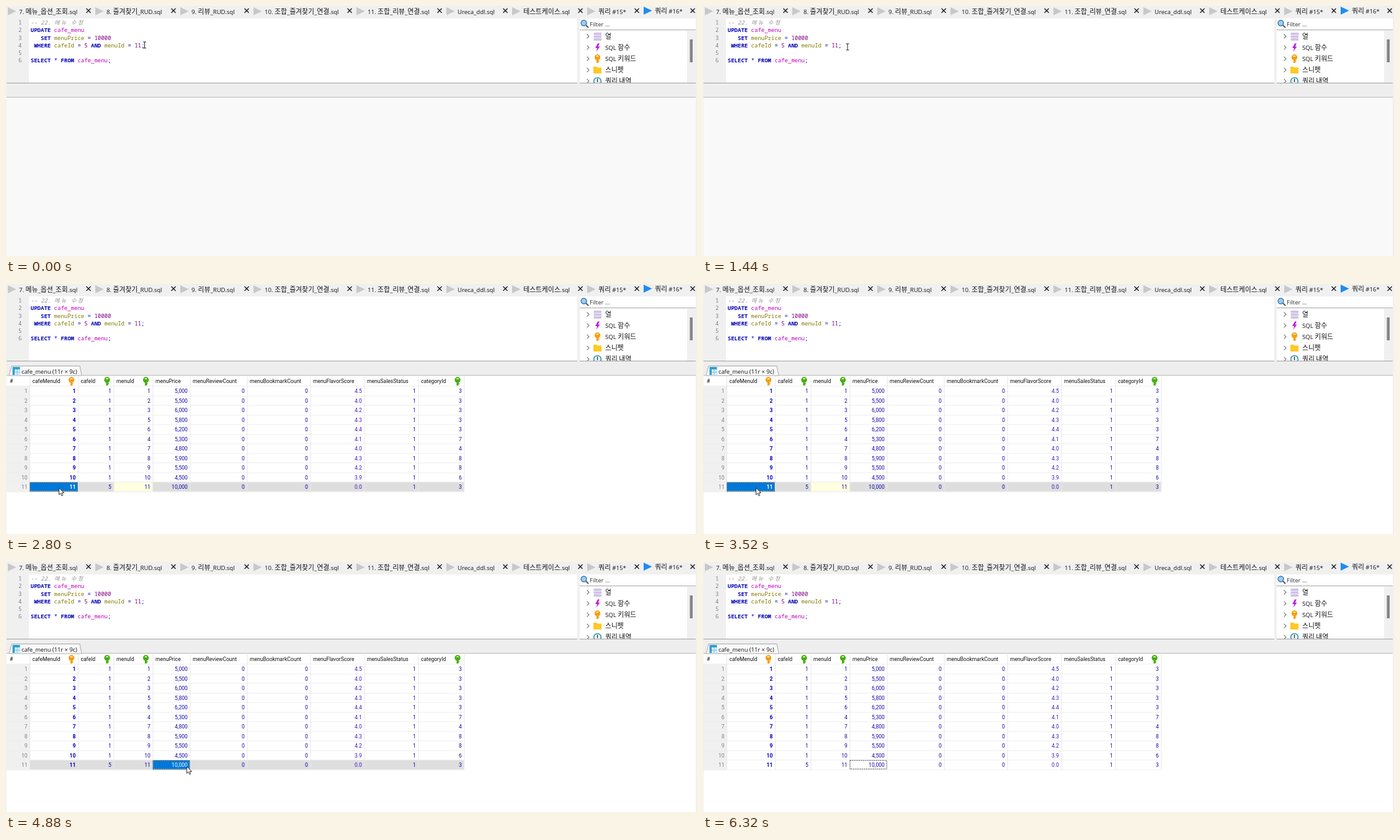
Animation, 1114 px wide and 404 px high, one loop 6400 ms. Source, as an HTML page with a canvas:

```html
<!DOCTYPE html>
<html lang="ko">
<head>
<meta charset="utf-8">
<title>SQL editor</title>
<style>
html, body { margin: 0; width: 100%; height: 100%; overflow: hidden; background: #f0f0f0; }
canvas { display: block; }
</style>
</head>
<body>
<canvas id="stage" width="1114" height="404"></canvas>
<script>
const ctx = document.getElementById('stage').getContext('2d');
const LOOP = 6400, STEP = 80;
const UI = '9.6px "Open Sans", "Noto Sans", sans-serif';
const HANGUL = '10.8px "Noto Sans CJK KR", "Noto Sans CJK", sans-serif';
const GRID = '8.55px Roboto, "Liberation Sans", sans-serif';
const CODE = '9px "Noto Sans Mono", "DejaVu Sans Mono", monospace';

// Event times in ms
const SELECT_START = 240, DESELECT = 1120, RESULT = 1600;
const PICK_ID = 2640, PICK_PRICE = 4480, CLEAR = 5280, HIDE = 5600;

const path = [
  [0, 223.5, 63], [80, 223.5, 63], [240, 202, 64], [640, 233, 66], [1440, 233, 66],
  [1840, 352, 230], [2080, 352, 230], [2560, 86, 331], [2640, 85, 329], [3600, 85, 329],
  [4160, 291, 329], [4960, 291, 330], [5280, 292, 349], [LOOP, 292, 349]
];

const tabs = [
  [3, '7. 메뉴_옵션_조회.sql', 133], [144, '8. 즐겨찾기_RUD.sql', 270],
  [281, '9. 리뷰_RUD.sql', 388], [399, '10. 조합_즐겨찾기_연결.sql', 554],
  [565, '11. 조합_리뷰_연결.sql', 699], [710, 'Ureca_ddl.sql', 805],
  [816, '테스트케이스.sql', 926], [937, '쿼리 #15*', 1017], [1028, '쿼리 #16*', 1107]
];

// Token kinds: k keyword, t table, i identifier, n number, o operator
const code = [
  [],
  [['k', 'UPDATE '], ['t', 'cafe_menu']],
  [['k', '   SET '], ['i', 'menuPrice'], ['o', ' = '], ['n', '10000']],
  [['k', ' WHERE '], ['i', 'cafeId'], ['o', ' = '], ['n', '5 '], ['k', 'AND '], ['i', 'menuId'], ['o', ' ='], ['n', ' 11'], ['o', ';']],
  [],
  [['k', 'SELECT '], ['o', '* '], ['k', 'FROM '], ['t', 'cafe_menu'], ['o', ';']]
];
const inks = { k: '#0000b4', t: '#c000c0', i: '#857a00', n: '#800080', o: '#0000d0' };

const edges = [1, 38, 116, 173.5, 236.5, 296.5, 388.5, 490.5, 577.5, 664.5, 738.5];
const heads = ['#', 'cafeMenuId', 'cafeId', 'menuId', 'menuPrice', 'menuReviewCount',
  'menuBookmarkCount', 'menuFlavorScore', 'menuSalesStatus', 'categoryId'];
const menuIds = '1 2 3 5 6 4 7 8 9 10 11'.split(' ');
const prices = '5,000 5,500 6,000 5,800 6,200 5,300 4,800 5,900 5,500 4,500 10,000'.split(' ');
const scores = '4.5 4.0 4.2 4.3 4.4 4.1 4.0 4.3 4.2 3.9 0.0'.split(' ');
const groups = '3 3 3 3 3 7 4 8 8 6 3'.split(' ');
const ROW = 15.5, TOP = 165;

function rect(x, y, w, h, color) {
  ctx.fillStyle = color;
  ctx.fillRect(x, y, w, h);
}

function poly(points, fill, stroke, width = 1) {
  ctx.beginPath();
  points.forEach(([x, y]) => ctx.lineTo(x, y));
  if (fill) { ctx.closePath(); ctx.fillStyle = fill; ctx.fill(); }
  if (stroke) { ctx.strokeStyle = stroke; ctx.lineWidth = width; ctx.stroke(); }
}

function disc(x, y, r, fill, stroke, width = 1) {
  ctx.beginPath();
  ctx.arc(x, y, r, 0, Math.PI * 2);
  if (fill) { ctx.fillStyle = fill; ctx.fill(); }
  if (stroke) { ctx.strokeStyle = stroke; ctx.lineWidth = width; ctx.stroke(); }
}

function text(str, x, y, font, color, align = 'left') {
  ctx.font = font;
  ctx.fillStyle = color;
  ctx.textAlign = align;
  ctx.fillText(str, x, y);
}

// Latin and Hangul runs use different faces and sizes
function label(str, x, y, color = '#111') {
  for (const run of str.match(/[가-힣]+|[^가-힣]+/g)) {
    text(run, x, y, /[가-힣]/.test(run) ? HANGUL : UI, color);
    x += ctx.measureText(run).width;
  }
}

function cross(x, y) {
  poly([[x - 3.5, y - 3.5], [x + 3.5, y + 3.5]], null, '#111', 1.2);
  poly([[x + 3.5, y - 3.5], [x - 3.5, y + 3.5]], null, '#111', 1.2);
}

function keyIcon(x, y, color) {
  rect(x - 1.6, y, 3.2, 7, color);
  rect(x + 1, y + 3.4, 2, 1.6, color);
  disc(x, y - 2, 4.7, color);
  rect(x - 1.7, y - 4.6, 3.4, 1.6, '#fff');
}

function drawTabs() {
  rect(0, 0, 1114, 20, '#f0f0f0');
  tabs.forEach(([x, name, close], i) => {
    const active = i === tabs.length - 1, y = active ? 7.5 : 8.5;
    poly([[x, y - 6.5], [x + 13.5, y], [x, y + 6.5]], active ? '#1e8cf0' : '#c8c8c8');
    label(name, x + 18, y + 4);
    cross(close, 7.5);
  });
}

function drawEditor(now, x) {
  rect(1, 20, 920, 104, '#fff');
  rect(1, 20, 36, 104, '#f0f0f0');
  rect(1, 124, 920, 1, '#a0a0a0');
  const base = i => 30.3 + i * 12.1;
  code.forEach((line, i) => {
    text(i + 1, 25.5, base(i), CODE, '#808080', 'right');
    let px = 39.8;
    for (const [kind, str] of line) {
      text(str, px, base(i), (kind === 'k' ? 'bold ' : '') + CODE, inks[kind]);
      px += ctx.measureText(str).width;
    }
  });
  text('-- 22.', 39.8, base(0), 'italic ' + CODE, '#909090');
  [...'메뉴 수정'].forEach((c, i) =>
    text(c, 78 + i * 10.8 - (i > 2 ? 5.4 : i > 1 ? 5.4 : 0), base(0), 'italic ' + HANGUL.replace('10.8', '9'), '#909090'));

  if (now > SELECT_START && now < DESELECT) {
    const cols = now >= 640 ? 4 : Math.max(0, Math.min(4, Math.round((x - 201.5) / 5.4)));
    rect(201, 57, cols * 5.5, 13, '#0078d7');
    text(' 11;'.slice(0, cols), 201.8, base(3), CODE, '#fff');
  }
}

function drawSidebar() {
  rect(925, 20, 187, 18, '#fff');
  rect(925, 38, 187, 1, '#b0b0b0');
  poly([[935, 31], [939, 35]], null, '#555', 2);
  disc(931.5, 27.5, 4.4, '#9cccf0', '#3a78b0', 1.5);
  label('Filter ...', 941, 32.5, '#333');

  ctx.save();
  ctx.beginPath();
  ctx.rect(925, 40, 187, 84);
  ctx.clip();
  rect(925, 40, 173, 84, '#fff');
  rect(1098, 40, 14, 84, '#f0f0f0');
  rect(1102.5, 54, 4.5, 37, '#858585');
  ['열', 'SQL 함수', 'SQL 키워드', '스니펫', '쿼리 내역'].forEach((name, i) => {
    const y = 49 + i * 18.1;
    poly([[936.5, y - 3.5], [940, y], [936.5, y + 3.5]], null, '#777', 1.1);
    label(name, 966, y + 4);
  });
  for (let i = 0; i < 3; i++) rect(947.5, 43 + i * 4.6, 12.5, 3.8, '#d0c2e6');
  poly([[954, 60.5], [950, 68], [953.2, 68], [951.5, 74], [957.5, 65.5], [954.5, 65.5], [957, 60.5]], '#bc20dc');
  keyIcon(953.5, 85, '#f5a010');
  poly([[947, 98], [952, 98], [953.5, 99.5], [960, 99.5], [960, 109], [947, 109]], '#ffc824');
  disc(953.5, 121.5, 5.8, '#fff', '#2896b4', 1.6);
  poly([[953.5, 117.5], [953.5, 123]], null, '#333', 1.5);
  ctx.restore();
  rect(925, 124, 187, 1, '#a0a0a0');
}

function drawGrid(now) {
  rect(1, 148, 1111, 256, '#fff');
  poly([[5, 148], [9, 132.5], [119, 132.5], [122, 148]], '#fafafa', '#a8a8a8');
  rect(10.5, 134, 12, 13, '#2e9fd0');
  rect(14, 138, 8.5, 9, '#d9f0fa');
  rect(17.5, 138, 1, 9, '#7cc4e4');
  rect(14, 142, 8.5, 1, '#7cc4e4');
  text('cafe_menu (11r × 9c)', 25, 145, '9.3px "Open Sans", "Noto Sans", sans-serif', '#111');

  const pick = now < PICK_ID || now >= CLEAR ? 0 : now < PICK_PRICE ? 1 : 4;
  const bottom = TOP + 11 * ROW, last = bottom - ROW;
  rect(1, TOP, 37, 11 * ROW, '#f0f0f0');
  if (pick) rect(38, last, 700, ROW, '#dedede');
  if (pick === 1) rect(edges[3], last, 63, ROW, '#ffffe1');
  for (let i = 0; i <= 11; i++) rect(1, Math.round(TOP + i * ROW) - .5, 738, 1, '#ededed');
  edges.slice(1).forEach(x => rect(x, 149, 1, bottom - 149, '#e8e8e8'));

  heads.forEach((name, i) => text(name, i ? edges[i] + 4.5 : 6, 160, GRID, '#111'));
  [105.5, 163, 225.5, 728].forEach((x, i) => keyIcon(x, 157, i ? '#45b010' : '#f5a010'));

  if (pick) {
    const x = edges[pick], w = edges[pick + 1] - x;
    rect(x, last, w, ROW, '#0078d7');
    dotted(x, last, w, '#ff9840');
  } else if (now >= CLEAR) {
    dotted(edges[4], last, 60, '#222');
  }

  for (let i = 0; i < 11; i++) {
    const y = 176 + i * ROW;
    text(i + 1, 34.5, y, GRID, '#808080', 'right');
    const cells = [i + 1, i < 10 ? 1 : 5, menuIds[i], prices[i], 0, 0, scores[i], 1, groups[i]];
    cells.forEach((v, c) => {
      const on = i === 10 && pick === c + 1;
      const color = on ? '#fff' : c === 6 ? '#4418c0' : c === 0 ? '#0000d0' : '#1008a8';
      text(v, edges[c + 2] - 3.7, y, (c ? '' : 'bold ') + GRID, color, 'right');
    });
  }
}

function dotted(x, y, w, color) {
  ctx.setLineDash([1.5, 1.5]);
  ctx.strokeStyle = color;
  ctx.lineWidth = 1;
  ctx.strokeRect(x + .5, y + .5, w - 1, ROW - 1.5);
  ctx.setLineDash([]);
}

function pointer(now) {
  const n = path.findIndex(p => p[0] > now), a = path[n - 1], b = path[n];
  const u = (now - a[0]) / (b[0] - a[0]), e = u * u * (3 - 2 * u);
  return [a[1] + (b[1] - a[1]) * e, a[2] + (b[2] - a[2]) * e];
}

function drawPointer(x, y) {
  if (y < 124) {
    poly([[x, y - 5], [x, y + 5]], null, '#222');
    for (const s of [-5, 5]) poly([[x - 2.5, y + s], [x + 2.5, y + s]], null, '#222');
    return;
  }
  const shape = [[0, 0], [0, 11], [2.6, 8.7], [4.4, 12.8], [6.2, 12], [4.5, 8], [8, 8], [0, 0]];
  poly(shape.map(([px, py]) => [x + px + .5, y + py + .5]), '#fff', '#222', .9);
}

function draw(now) {
  const [x, y] = pointer(now);
  rect(0, 0, 1114, 404, '#f0f0f0');
  drawTabs();
  drawEditor(now, x);
  drawSidebar();
  rect(1, 125, 1111, 23, '#eeeeee');
  rect(1, 148, 1111, 256, '#f9f9f9');
  if (now >= RESULT) drawGrid(now);
  rect(1, 147, now >= RESULT ? 4 : 1111, 1, '#b8b8b8');
  if (now >= RESULT) rect(122, 147, 990, 1, '#b8b8b8');
  if (now < HIDE) drawPointer(x, y);
}

const start = performance.now();
function tick() {
  const t = (performance.now() - start) % LOOP;
  draw(Math.floor(t / STEP) * STEP);
  requestAnimationFrame(tick);
}
tick();
</script>
</body>
</html>
```
